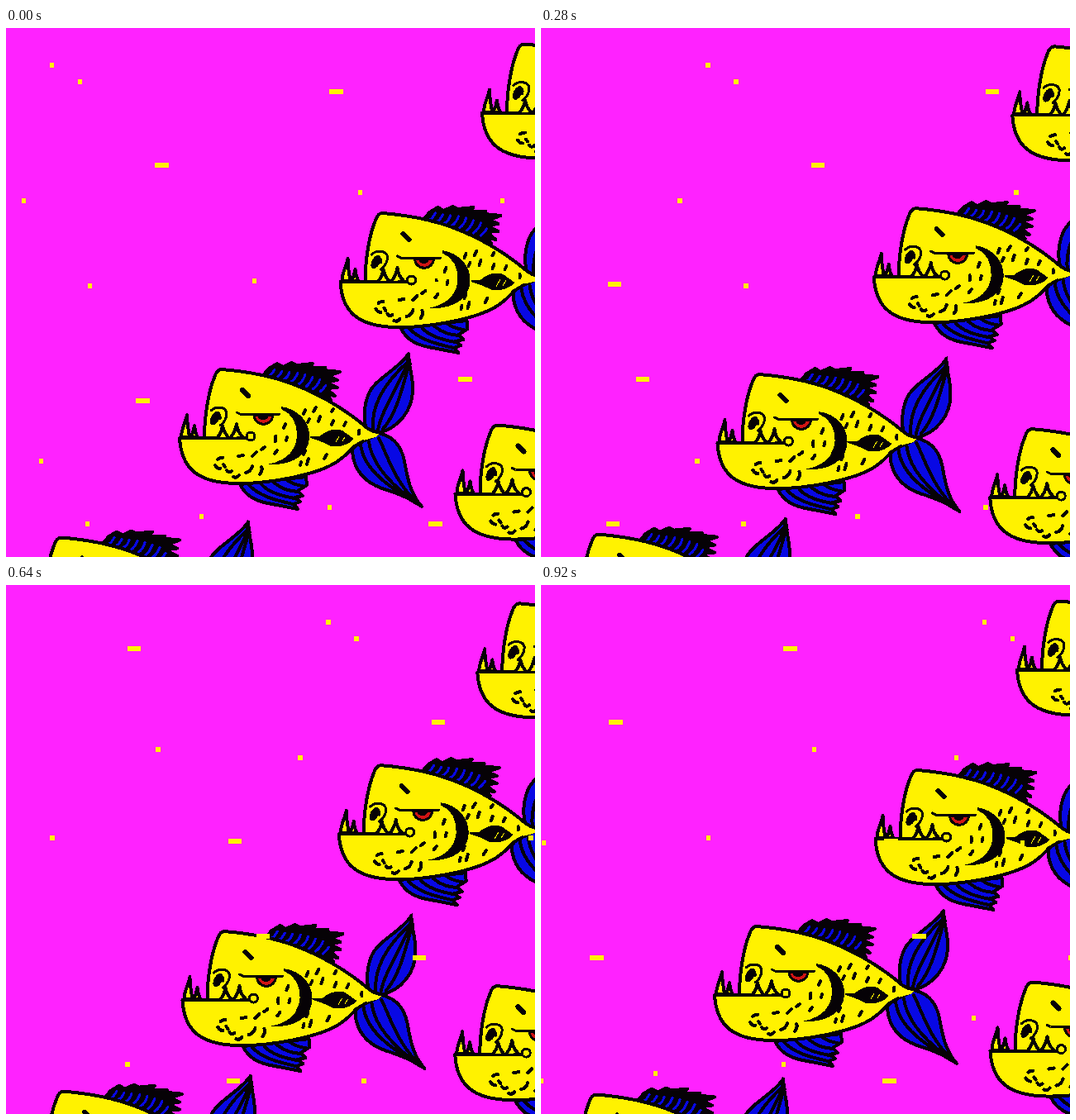
Animation of 640 by 640 pixels, one loop 960 ms. Source, as an HTML page:

```html
<!DOCTYPE html>
<html lang="en">
<head>
<meta charset="utf-8">
<title>Fish shoal</title>
<style>
html, body { margin: 0; width: 100%; height: 100%; overflow: hidden; background: #ff22ff; }
svg { display: block; width: 100vw; height: 100vh; shape-rendering: crispEdges; }
.ink { fill: none; stroke: #060206; stroke-width: 4; stroke-linecap: round; stroke-linejoin: round; }
.thin { stroke-width: 3; }
.blue { fill: #0808e4; }
.yellow { fill: #fff200; }
.red { fill: #d01414; }
.black { fill: #060206; stroke: none; }
</style>
</head>
<body>
<svg viewBox="0 0 640 640">
  <defs>
    <g id="fish" class="ink">
      <!-- tail -->
      <path class="blue" d="M436 485C432 474 433 456 439 442C447 424 476 412 487 394C486 406 493 420 492 440C491 462 476 484 450 490Z"/>
      <path d="M444 485C442 462 453 434 486 404M450 486C455 462 471 440 487 404M456 485C473 466 479 436 488 406"/>
      <path class="blue" d="M449 492C434 500 419 503 419 513C421 534 433 549 455 557C474 563 490 569 503 579C489 563 486 546 482 524C478 504 466 493 450 490Z"/>
      <path d="M429 504C432 530 454 550 498 576M439 500C442 526 464 552 500 577M451 496C461 516 470 550 500 577"/>
      <path class="black" d="M483 405L488 391L491 408ZM481 563L505 580L489 572Z"/>

      <!-- dorsal fin -->
      <path style="fill:#060206" d="M307 425L318 412L328 406L335 410L346 405L352 408L371 406L367 411L386 411L384 414L404 416L390 421L401 426L387 428L401 435L387 436L398 445L388 443L393 450L370 441L330 426Z"/>
      <path style="stroke:#0808e4;stroke-width:3" d="M318 421Q321 420 325 413M327 423Q331 421 334 415M336 425Q341 423 343 416M345 428Q350 425 353 417M354 431Q360 427 362 419M363 434Q368 430 371 422M371 437Q377 433 380 425M380 440Q384 437 387 432"/>

      <!-- belly fin -->
      <path class="blue" d="M283 552C290 566 302 573 322 576L353 582L348 576L356 573L349 568L359 566L353 560L364 553L363 543Z"/>
      <path d="M294 553C306 566 325 571 347 576M309 552C318 562 333 566 349 569M324 550C334 558 342 560 354 561M340 547Q349 553 359 554"/>

      <!-- left fangs -->
      <path class="yellow" d="M212 495C212 485 217 478 219 468C219 480 221 487 222 495ZM223 495Q227 489 228 481Q229 490 232 495Z"/>

      <!-- body -->
      <path class="yellow" stroke="none" d="M425 478L438 484Q446 490 453 489L447 495L432 499L415 510Z"/>
      <path class="yellow" stroke="none" d="M210 497L240 496C240 470 245 440 252 423Q255 413 261 413C285 415 318 420 345 430C380 443 410 460 438 484L420 508Q412 517 400 525C376 541 315 552 277 551C232 550 212 533 210 497Z"/>
      <path d="M452 489Q444 489 437 484C410 461 380 443 345 430C318 420 285 415 261 413Q255 413 252 423C245 440 240 470 240 496H210C212 533 232 550 277 551C315 552 376 541 400 525Q412 517 420 507L432 500"/>
      <path d="M210 496H290"/>
      <circle class="yellow thin" cx="296" cy="494" r="5"/>
      <path class="yellow" d="M256 495Q261 489 262 481Q264 490 269 495M272 495Q277 489 279 479Q280 489 286 494"/>

      <!-- face -->
      <ellipse class="black" cx="253" cy="472" rx="5" ry="9" transform="rotate(28 253 472)"/>
      <path class="thin" d="M248 463C254 457 266 458 267 466Q267 475 259 481M254 466Q260 466 259 473"/>
      <path style="stroke-width:6" d="M286 438L293 445"/>
      <path class="red thin" d="M300 468C301 483 322 483 323 468Z"/>
      <ellipse class="black" cx="311" cy="470" rx="6" ry="4"/>
      <path class="thin" d="M279 465L283 467H331"/>

      <!-- gill and side mark -->
      <path class="black" d="M333 458C354 461 368 477 367 496C366 516 347 530 316 528C338 524 350 513 352 495C353 480 347 467 333 461Z"/>
      <path class="black" d="M368 494L379 494Q394 482 407 487L421 497Q411 508 393 506Q382 500 368 496Z"/>
      <path style="stroke:#fff200;stroke-width:1" d="M399 501L403 494M407 500L410 495"/>

      <!-- scales -->
      <path d="M362 462L360 467M375 459L372 464M367 473L365 477M380 470L378 476M396 461L394 464M396 475L394 480M411 477L409 481M427 487V491M362 511L360 516M366 521L364 528M357 525L356 529M388 516L385 521M338 479L336 484M340 495L339 499M326 494V500M328 511L325 515M313 507L309 510M303 513L298 518M287 517L281 518"/>
      <path d="M256 522Q258 520 262 520M253 529Q255 533 259 533M263 528L265 531M267 535Q269 539 273 536M275 543Q279 545 282 541M298 530Q296 537 290 538M309 531Q311 535 307 540"/>
    </g>
    <g id="specks" class="yellow"></g>
  </defs>
  <g id="shoal"></g>
  <g id="drift">
    <use href="#specks" x="-579"/>
    <use href="#specks"/>
    <use href="#specks" x="579"/>
  </g>
</svg>
<script>
const NS = "http://www.w3.org/2000/svg";
const byId = id => document.getElementById(id);

function add(parent, tag, attrs) {
  const el = document.createElementNS(NS, tag);
  for (const key in attrs) el.setAttribute(key, attrs[key]);
  return parent.appendChild(el);
}

// Speck centres
const dots = [[55, 44], [89, 64], [21, 208], [428, 198], [101, 311], [300, 305],
  [42, 523], [391, 579], [98, 599], [236, 590]];
const dashes = [[399, 76], [188, 165], [165, 450], [555, 424], [519, 599], [521, 309]];

function addSpecks(list, width) {
  for (const [x, y] of list)
    add(byId("specks"), "rect", { x: x - width / 2 + 0.5, y: y - 2, width, height: 5.6 });
}
addSpecks(dots, 5.5);
addSpecks(dashes, 16.5);

// Each axis: start, linear and quadratic drift
const shoal = [
  { x: [0, 8, -4], y: [0, 14, -7] },
  { x: [194.5, 1, -6], y: [-189, -9.2, 0] },
  { x: [366, -9, 0], y: [-393.5, 0, 7] },
  { x: [333.5, -4.5, 6.5], y: [67.5, 13, -9] },
  { x: [-194, 3.5, 1.5], y: [203.5, -7, 1.5] }
].map(path => ({ ...path, el: add(byId("shoal"), "use", { href: "#fish" }) }));

const STEP = 40, STEPS = 24, SPEED = 20.91;
const along = ([start, a, b], u) => start + a * u + b * u * u;

function draw() {
  const n = Math.floor(performance.now() / STEP) % STEPS;
  const u = Math.min(n, STEPS - 1 - n) / 11;
  for (const { x, y, el } of shoal)
    el.setAttribute("transform", `translate(${along(x, u)} ${along(y, u)})`);
  byId("drift").setAttribute("transform", `translate(${n * SPEED} 0)`);
  requestAnimationFrame(draw);
}
draw();
</script>
</body>
</html>
```
